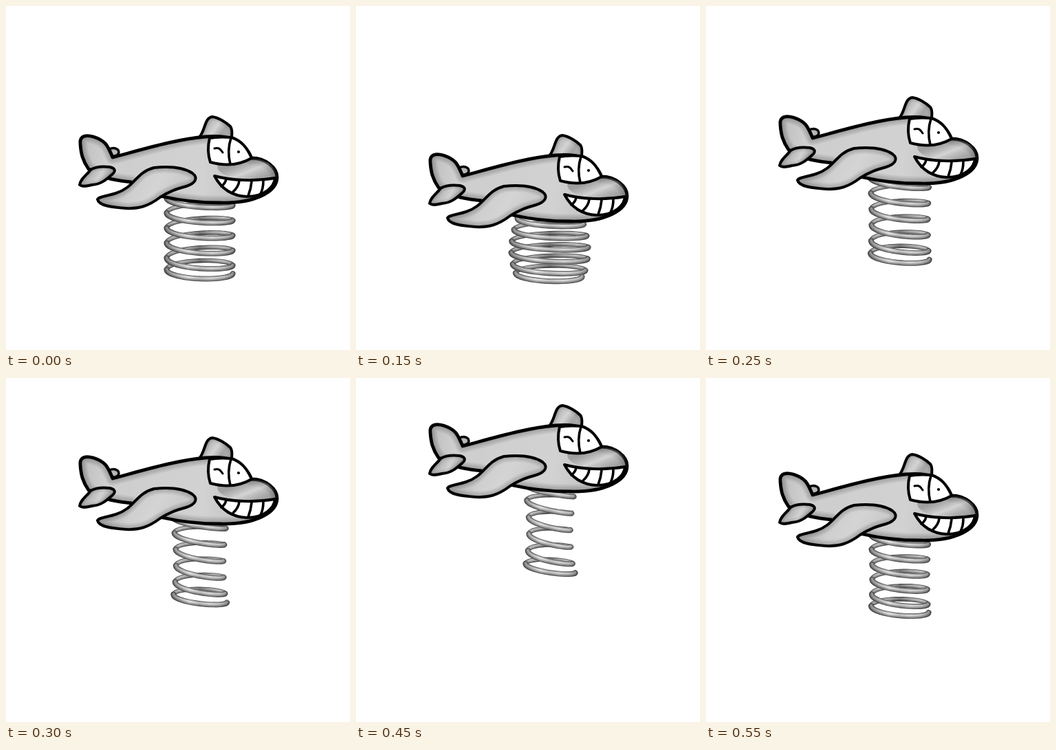
An HTML page with a canvas for the animation above (0.6 s loop, 500x500 px).

```html
<!DOCTYPE html>
<html lang="en">
<head>
<meta charset="utf-8">
<title>Spring plane</title>
<style>
html, body { margin: 0; width: 100%; height: 100%; overflow: hidden; background: #fff; }
canvas { display: block; width: 100vw; height: 100vh; }
</style>
</head>
<body>
<canvas id="stage" width="500" height="500"></canvas>
<script>
const ctx = document.getElementById('stage').getContext('2d');
const STEP = 50;

// One pose per step: plane offset, spring bottom, coil radius, bulge, coil depth
const POSES = [
  [0, 403, 48, 0, 9],
  [29, 404, 47, 12, 8],
  [37, 407, 47, 15, 7.5],
  [27, 406, 47, 9, 8],
  [0, 403, 47, 0, 9],
  [-28, 380, 43, -2, 8],
  [-74, 335, 39.5, -5, 6.5],
  [-112, 299, 37, -8, 5],
  [-130, 281, 36.5, -8, 5],
  [-121, 290, 37, -7, 5.5],
  [-90, 316, 40, -4.5, 6.5],
  [-50, 352, 42, -2, 8]
];

const SHAPES = {
  rearTail: 'M150 208 C157 205 164 207 164 213 C163 218 158 218 153 219 Z',
  cap: 'M280 192 C290 182 288 162 300 161 C309 162 321 170 326 175 C330 180 328 186 328 192 Z',
  body: 'M108 201 C106 188 117 187 127 190 C146 196 148 204 155 220 C200 208 250 193 290 190 ' +
    'C324 187 345 194 357 221 C377 221 394 235 394 249 C394 270 362 287 312 286 ' +
    'C278 286 250 282 228 277 L182 256 C166 254 156 253 148 250 L120 237 C111 224 109 214 108 201 Z',
  frontTail: 'M107 260 C108 251 118 245 123 238 C131 233 142 233 151 234 C159 236 160 240 154 245 ' +
    'C145 253 138 259 125 260 C117 262 111 263 107 260 Z',
  wing: 'M133 281 C135 277 148 276 160 272 C188 263 188 242 215 235 C235 233 257 234 271 243 ' +
    'C280 250 275 258 262 262 C248 266 238 269 224 278 C207 291 193 295 174 294 C157 293 135 291 133 281 Z',
  glass: 'M296 192 C293 204 293 215 297 227 C319 233 340 231 357 221 C350 205 342 196 328 191 C316 190 306 190 296 192 Z',
  mouth: 'M303 247 C328 254 362 255 391 250 C390 263 376 277 350 277 C327 276 312 264 303 247 Z',
  teeth: 'M320 251 Q319 258 313 262 M339 254 Q338 263 330 270 M357 255 Q356 266 352 276 M374 254 Q374 265 370 273',
  divider: 'M327 192 Q321 210 326 230',
  wink: 'M303 207 C309 205 312 208 315 213'
};
for (const name in SHAPES) SHAPES[name] = new Path2D(SHAPES[name]);

const grey = v => `rgb(${v},${v},${v})`;

function ramp(x0, y0, x1, y1, tones) {
  const g = ctx.createLinearGradient(x0, y0, x1, y1);
  tones.forEach((v, i) => g.addColorStop(i / (tones.length - 1), grey(v)));
  return g;
}

function line(path, width, color = '#000') {
  ctx.lineWidth = width;
  ctx.strokeStyle = color;
  ctx.stroke(path);
}

function part(path, fill, outline, depth) {
  ctx.save();
  ctx.clip(path);
  ctx.fillStyle = fill;
  ctx.fill(path);
  for (let w = 3; w <= depth; w += 3) line(path, w, 'rgba(0,0,0,.045)');
  ctx.restore();
  line(path, outline);
}

function drawPlane() {
  part(SHAPES.rearTail, grey(190), 3.5, 9);
  part(SHAPES.cap, ramp(285, 165, 322, 192, [150, 185, 212, 165, 175]), 4, 12);
  part(SHAPES.body, ramp(108, 235, 394, 245, [190, 208, 206, 208, 208, 210, 200, 200, 196]), 4.8, 21);

  // Soft shade across the nose
  ctx.save();
  ctx.clip(SHAPES.body);
  const shade = ctx.createLinearGradient(350, 224, 362, 254);
  shade.addColorStop(0, 'rgba(60,60,60,.3)');
  shade.addColorStop(.5, 'rgba(235,235,235,.35)');
  shade.addColorStop(1, 'rgba(60,60,60,.25)');
  ctx.fillStyle = shade;
  ctx.beginPath();
  ctx.ellipse(355, 238, 48, 17, .1, 0, 7);
  ctx.fill();
  ctx.restore();

  part(SHAPES.frontTail, ramp(112, 240, 145, 258, [160, 185, 210, 165]), 4, 12);
  part(SHAPES.wing, ramp(165, 250, 230, 290, [182, 207, 212, 204]), 4, 18);

  for (const name of ['glass', 'mouth']) {
    ctx.fillStyle = '#fff';
    ctx.fill(SHAPES[name]);
    line(SHAPES[name], 4);
  }
  line(SHAPES.teeth, 3.6);
  line(SHAPES.divider, 3.6);
  line(SHAPES.wink, 3);
  ctx.fillStyle = '#000';
  ctx.beginPath();
  ctx.arc(338, 212, 2.1, 0, 7);
  ctx.fill();
}

function drawSpring([lift, bottom, radius, bulge, depth]) {
  const cx = 281.5, turns = 5.5;
  const top = 290 + lift;
  const end = bottom - 4 - depth * 1.1;
  const pitch = (end - top) / 4.55;
  const tilt = (48 - radius) * .3;

  function point(u) {
    const a = u * 2 * Math.PI, s = u / turns;
    const r = radius + bulge * Math.sin(Math.PI * s);
    const drop = u < 4.5 ? u - .5 : 4 + (u - 4.5) * .55;
    return [cx - r * Math.cos(a),
      top + drop * pitch + depth * (.85 + .3 * s) * Math.sin(a) - tilt * (1 + Math.cos(a)) + tilt];
  }

  function strand(from, width, tones) {
    const path = new Path2D();
    for (let i = 0; i <= 24; i++) path.lineTo(...point(from + i / 48));
    const reach = radius + Math.max(bulge, 0) + 4;
    const tint = k => ramp(cx - reach, 0, cx + reach, 0, tones.map(v => Math.min(235, v * k)));
    line(path, width, tint(.58));
    ctx.save();
    ctx.translate(0, -.4);
    line(path, width - 2.4, tint(1));
    ctx.translate(0, -.5);
    line(path, width - 5.6, tint(1.3));
    ctx.restore();
  }

  for (let n = 0; n < 5; n++) strand(n + .5, 6.6, [125, 165, 145, 105, 145, 165, 120]);
  for (let n = 0; n < 6; n++) strand(n, 8, [100, 140, 175, 150, 165, 150, 105]);
}

function draw(now) {
  const pose = POSES[Math.floor(now / STEP) % POSES.length];
  ctx.fillStyle = '#fff';
  ctx.fillRect(0, 0, 500, 500);
  ctx.lineCap = ctx.lineJoin = 'round';
  drawSpring(pose);
  ctx.save();
  ctx.translate(0, pose[0]);
  drawPlane();
  ctx.restore();
}

const start = performance.now();
function tick() {
  draw(performance.now() - start);
  requestAnimationFrame(tick);
}
tick();
</script>
</body>
</html>
```
